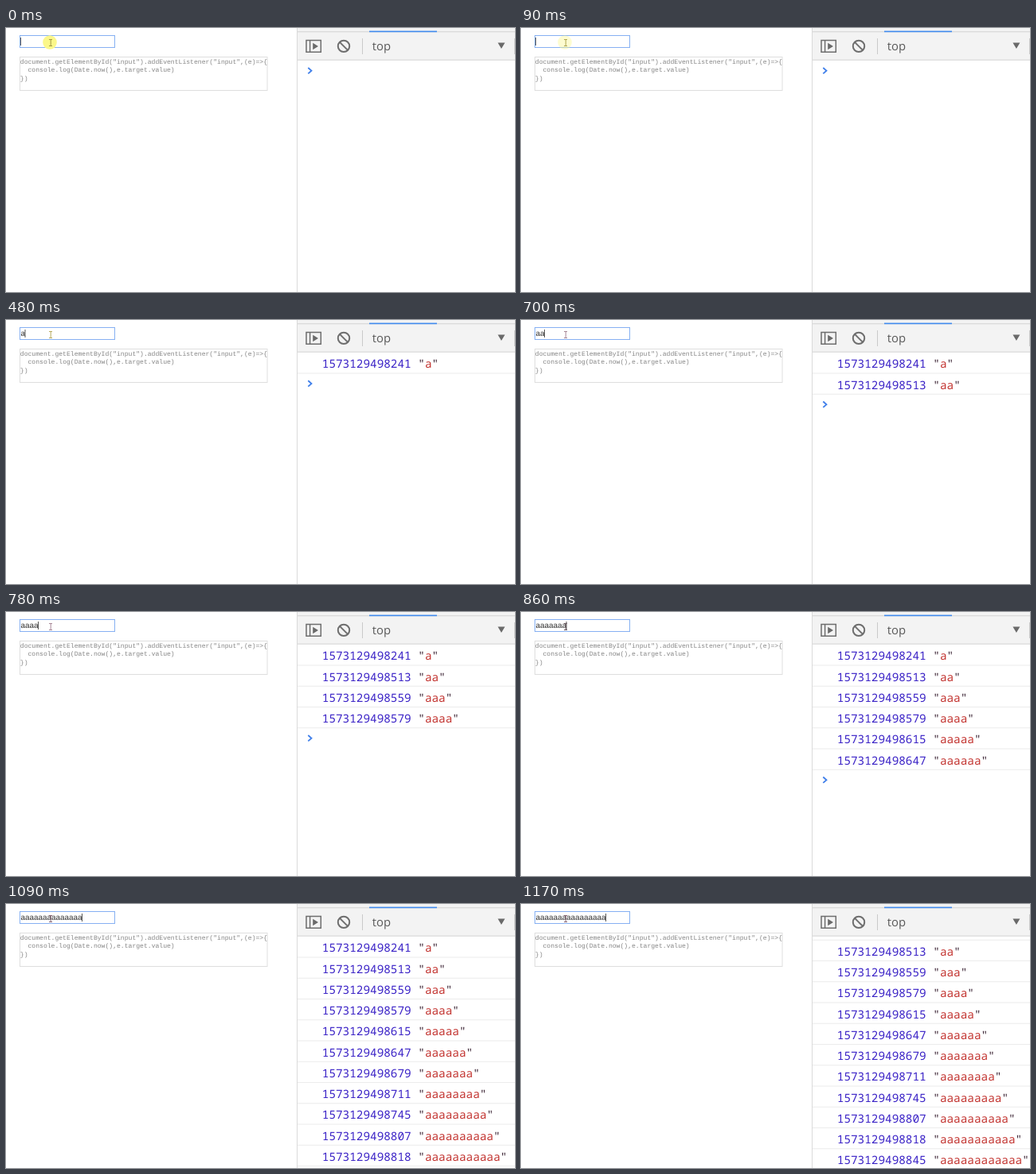
These frames come from a looping animation (639x332 px, 1260 ms). An HTML page:

```html
<!DOCTYPE html>
<html lang="en">
<head>
<meta charset="utf-8">
<title>Input event log</title>
<style>
  html, body { margin: 0; width: 100%; height: 100%; overflow: hidden; background: #fff; }
  svg { display: block; width: 100vw; height: 100vh; }
  text { text-rendering: geometricPrecision; white-space: pre; }
  .code { font: 8.08px "Liberation Mono", monospace; fill: #858585; }
  .field { font: 9.9px "Liberation Sans", Arial, sans-serif; fill: #333; }
  .log { font: 14.35px "Noto Sans Mono", monospace; fill: #3a22c6; }
  .quote { fill: #3c2535; }
  .value { fill: #c2322e; }
  .top { font: 14.8px "Open Sans", sans-serif; fill: #5a5a5a; }
  .line { fill: none; stroke-width: 1; }
</style>
</head>
<body>
<svg viewBox="0 0 639 332">
  <rect width="639" height="332" fill="#fff"/>

  <rect class="line" x="17.5" y="9.5" width="119" height="15" stroke="#86b0f2"/>
  <circle id="glow" cx="55" cy="18" r="8.8" fill="#fbf78a"/>
  <text id="field" class="field" x="18.6" y="20.4"></text>
  <rect id="caret" y="12" width="1" height="10" fill="#555"/>
  <path id="beam" class="line" d="M54 14.5h4M56.2 14.5v8M54 22.5h4"/>

  <rect class="line" x="17.5" y="36.5" width="310.5" height="42" stroke="#dedede"/>
  <g class="code">
    <text x="17.8" y="44.8">document.getElementById("input").addEventListener("input",(e)=&gt;{</text>
    <text x="27.5" y="55.2">console.log(Date.now(),e.target.value)</text>
    <text x="17.8" y="65.6">})</text>
  </g>

  <g id="list">
    <g id="rows"></g>
    <path id="prompt" d="M379.3 50l4.2 3.7l-4.2 3.7" fill="none" stroke="#3f7fea" stroke-width="1.8"/>
  </g>

  <rect x="366" width="273" height="40" fill="#f3f3f3"/>
  <path class="line" d="M366 4.8H639M366 40.2H639" stroke="#d2d2d2"/>
  <path class="line" d="M447.5 13V33M638.5 13V33" stroke="#cacaca"/>
  <rect x="456" y="3.6" width="85" height="1.6" fill="#3f8aee"/>
  <g fill="none" stroke="#6e6e6e" stroke-width="1.5">
    <path d="M377 15.5H395.3V30.2H377ZM381.6 15.5V30"/>
    <circle cx="424" cy="22.9" r="7.2" stroke-width="2"/>
    <path d="M419 17.9l10 10" stroke-width="2"/>
  </g>
  <path d="M385.2 18.7l6.8 4.3l-6.8 4.3zM617.4 18.5h9l-4.5 7.5z" fill="#6a6a6a"/>
  <text class="top" x="459.8" y="28.4">top</text>
  <path class="line" d="M365.5 0V332" stroke="#dadada"/>
</svg>
<script>
  const LOOP = 1260, PITCH = 26.25, CHAR = 5.5;
  const stamps = [241, 513, 559, 579, 615, 647, 679, 711, 745, 807, 818, 845];

  // start ms, typed letters, logged rows, glow opacity, pointer colour, scroll
  const steps = [
    [0, 0, 0, 1, '#a39c48', 0],
    [90, 0, 0, .4, '#b0a850', 0],
    [190, 1, 0, 0, '#c6bd62', 0],
    [480, 1, 1, 0, '#b8ac60', 0],
    [700, 2, 2, 0, '#a88898', 0],
    [780, 4, 4, 0, '#a88898', 0],
    [860, 7, 6, 0, '#6a5a62', 0],
    [930, 9, 8, 0, '#8a6a78', 0],
    [1010, 12, 10, 0, '#8a6a78', 0],
    [1090, 14, 11, 0, '#8a6a78', 0],
    [1170, 16, 12, 0, '#8a6a78', 21.75]
  ];

  const $ = id => document.getElementById(id);
  const set = (id, name, value) => $(id).setAttribute(name, value);

  $('rows').innerHTML = stamps.map((ms, i) => `
    <g transform="translate(0 ${i * PITCH})">
      <text class="log" x="396.8" y="60.3">1573129498${ms} <tspan class="quote">"</tspan><tspan
        class="value">${'a'.repeat(i + 1)}</tspan><tspan class="quote">"</tspan></text>
      <rect x="366" y="66.5" width="273" height="1" fill="#ececec"/>
    </g>`).join('');
  const rows = [...$('rows').children];

  let shown;
  function draw(now) {
    const t = now % LOOP;
    const step = steps.findLast(s => s[0] <= t);
    if (step === shown) return;
    shown = step;
    const [, typed, logged, glow, color, scroll] = step;
    $('field').textContent = 'a'.repeat(typed);
    set('caret', 'x', 18 + typed * CHAR);
    set('glow', 'opacity', glow);
    set('beam', 'stroke', color);
    rows.forEach((row, i) => row.setAttribute('visibility', i < logged ? 'visible' : 'hidden'));
    set('prompt', 'transform', `translate(0 ${logged * PITCH})`);
    set('list', 'transform', `translate(0 ${-scroll})`);
  }

  const start = performance.now();
  function tick() {
    draw(performance.now() - start);
    requestAnimationFrame(tick);
  }
  tick();
</script>
</body>
</html>
```
